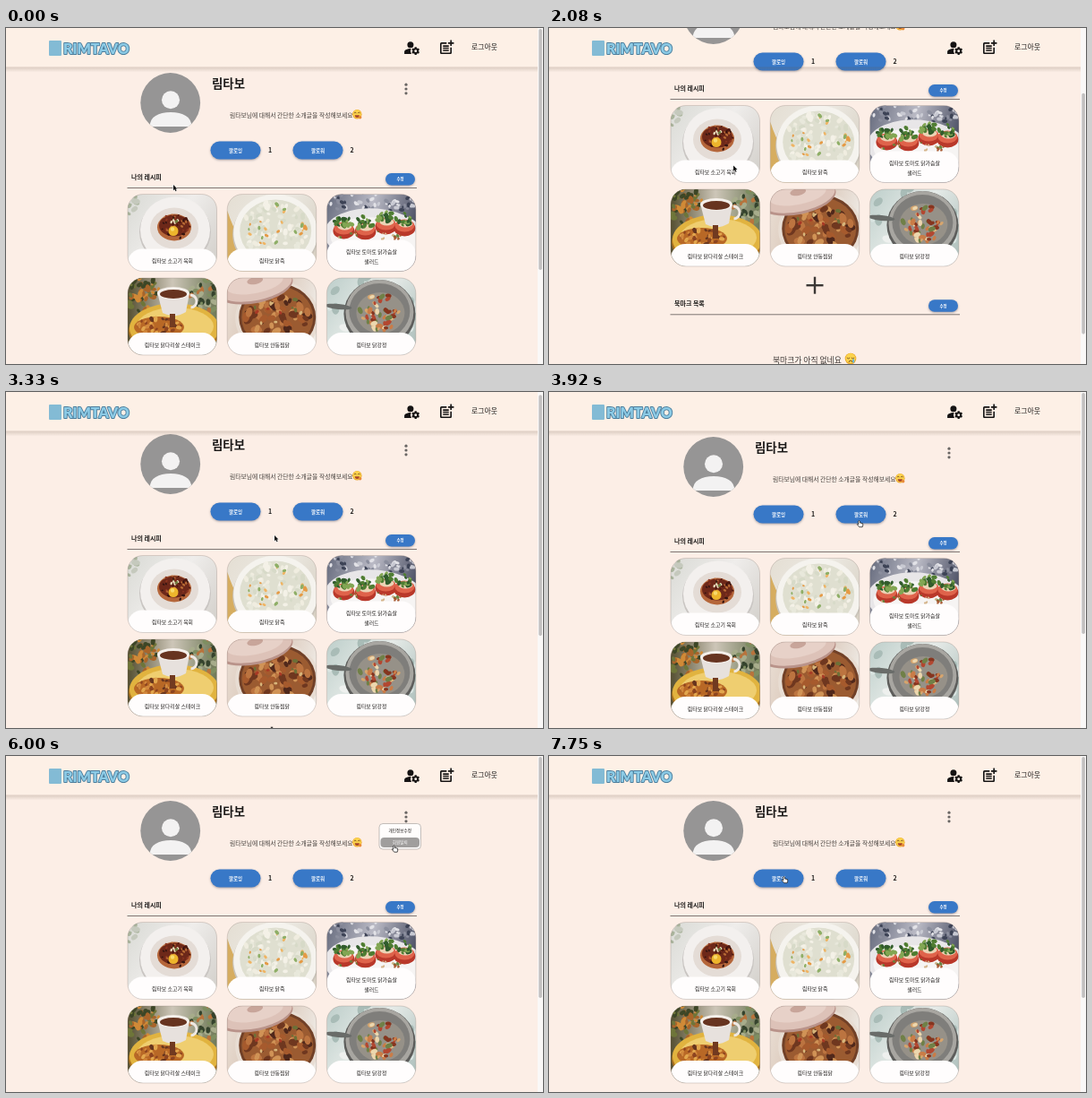
Recreate the animation shown at these times as an HTML page with a canvas. Size 600 by 375 pixels, loop 8000 ms.

```html
<!DOCTYPE html>
<html lang="ko">
<head>
<meta charset="utf-8">
<title>나의 레시피</title>
<style>
html, body { margin: 0; width: 100%; height: 100%; overflow: hidden; background: #fceee6; }
canvas { display: block; width: 600px; height: 375px; }
</style>
</head>
<body>
<canvas id="stage"></canvas>
<script>
const LOOP = 8000, STEP = 1000 / 12, LAST = 93;
const KO = '"Noto Sans CJK KR", "Noto Sans CJK", sans-serif';
const BLUE = '#3878c7', INK = '#1c1a19';
const canvas = document.getElementById('stage');
const ctx = canvas.getContext('2d');
const ratio = Math.max(1, window.devicePixelRatio || 1);
canvas.width = 600 * ratio;
canvas.height = 375 * ratio;

// Keys are [step, value, value, ...]
const SCROLL = [[19, 0], [20, 5], [22, 47], [25, 99], [28, 130], [31, 143], [35, 143], [36, 118], [38, 42], [39, 16], [40, 3], [41, 0]];
const POINTER = [[2, 187, 175], [9, 206, 153.5], [28, 206, 153.5], [35, 239.5, 165.5], [40, 300, 160], [46, 346.5, 143.5],
  [50, 346.5, 143.5], [56, 446, 67], [59, 446, 67], [65, 440, 82], [71, 433.5, 100], [75, 433.5, 100], [82, 300, 122], [88, 262.5, 134.5]];
const HOVER = [[29, 0], [32, 1], [35, 1], [38, 0]];
const MENU_OPEN = 58, MENU_SHUT = 77;

const linear = u => u;
const smooth = u => u * u * (3 - 2 * u);

function at(keys, n, ease) {
  const i = keys.findIndex(k => k[0] > n);
  if (i === 0) return keys[0].slice(1);
  if (i < 0) return keys[keys.length - 1].slice(1);
  const a = keys[i - 1], b = keys[i];
  const u = ease((n - a[0]) / (b[0] - a[0]));
  return a.slice(1).map((v, j) => v + (b[j + 1] - v) * u);
}

function seeded(seed) {
  return () => (seed = (seed * 16807) % 2147483647) / 2147483647;
}

function rect(x, y, w, h, color) {
  ctx.fillStyle = color;
  ctx.fillRect(x, y, w, h);
}

function round(x, y, w, h, r, color) {
  ctx.beginPath();
  ctx.roundRect(x, y, w, h, r);
  ctx.fillStyle = color;
  ctx.fill();
}

function oval(x, y, rx, ry, color, turn = 0) {
  ctx.beginPath();
  ctx.ellipse(x, y, rx, ry, turn, 0, Math.PI * 2);
  ctx.fillStyle = color;
  ctx.fill();
}

function dot(x, y, r, color) {
  oval(x, y, r, r, color);
}

function text(str, x, y, size, { color = INK, weight = 500, align = 'left', family = KO } = {}) {
  ctx.font = `${weight} ${size}px ${family}`;
  ctx.textAlign = align;
  ctx.fillStyle = color;
  ctx.fillText(str, x, y + size * 0.37);
}

function shadowed(color, blur, dy, draw) {
  ctx.save();
  ctx.shadowColor = color;
  ctx.shadowBlur = blur * ratio;
  ctx.shadowOffsetY = dy * ratio;
  draw();
  ctx.restore();
}

function fade(x0, y0, x1, y1, ...colors) {
  const g = ctx.createLinearGradient(x0, y0, x1, y1);
  colors.forEach((c, i) => g.addColorStop(i / (colors.length - 1), c));
  return g;
}

// Scatters small bits of food inside an ellipse.
function bits(seed, count, x, y, rx, ry, size, colors) {
  const rnd = seeded(seed);
  for (let i = 0; i < count; i++) {
    const a = rnd() * Math.PI * 2, d = Math.sqrt(rnd()), s = size * (0.6 + rnd() * 0.7);
    oval(x + Math.cos(a) * d * rx, y + Math.sin(a) * d * ry, s, s * 0.65, colors[i % colors.length], rnd() * 3);
  }
}

function beefBowl() {
  rect(0, 0, 100, 87, fade(0, 0, 100, 70, '#d9dad5', '#efedeb', '#d4d1cc'));
  bits(11, 10, 4, 10, 9, 14, 4, ['#a9b39b', '#c5c9bd']);
  oval(53, 42, 40, 38, '#c9c5c2');
  oval(53, 40, 39, 37, '#f3f0ee');
  oval(52, 38, 27, 23, '#e4dcd6');
  oval(52, 37, 19, 15, '#b5663a');
  oval(52, 35, 17, 12, '#6d2819');
  bits(7, 42, 52, 36, 18, 14, 1.7, ['#4d170f', '#8c3520', '#b96c35', '#351410']);
  dot(51, 41, 5.5, '#edb52c');
  dot(50, 39, 2.2, '#f8da6c');
  bits(5, 7, 52, 29, 5, 4, 1.5, ['#e8dcbc', '#718141']);
}

function porridge() {
  rect(0, 0, 100, 87, fade(0, 0, 100, 60, '#e4ded3', '#ece9e2', '#d8d1c4'));
  ctx.beginPath();
  ctx.moveTo(0, 18);
  ctx.quadraticCurveTo(10, 50, 38, 87);
  ctx.lineTo(0, 87);
  ctx.fillStyle = '#d6ad60';
  ctx.fill();
  oval(54, 45, 48, 44, '#c9c3b9');
  oval(54, 43, 47, 43, '#f5f3ee');
  oval(54, 41, 40, 35, '#dfdfd0');
  bits(23, 90, 54, 40, 37, 32, 3.2, ['#f4f1e7', '#e8e8db', '#d7dac8', '#f0ede0']);
  bits(38, 24, 54, 38, 34, 28, 2.3, ['#e59a45', '#8eae66', '#efb463']);
}

function salad() {
  rect(0, 0, 100, 87, fade(0, 0, 100, 30, '#666b7d', '#babac5', '#4d5165'));
  bits(17, 60, 50, 8, 52, 13, 2.5, ['#e2e2e7', '#3d4356', '#8b8e9d', '#c9cad3']);
  oval(54, 47, 57, 31, '#e8e6e8', 0.08);
  oval(54, 50, 50, 24, '#f6f4f3', 0.08);
  [[19, 37], [43, 38], [66, 32], [87, 34]].forEach(([x, y], i) => {
    oval(x, y + 4, 12, 9, '#b9382a');
    oval(x, y + 1, 11, 7, '#df634b');
    oval(x + 1, y - 1, 8, 4, '#ecd3b5');
    bits(31 + i, 14, x - 1, y - 6, 10, 7, 3, ['#4f7d32', '#315c2c', '#82a653']);
  });
  bits(71, 28, 51, 50, 43, 9, 1.7, ['#a85931', '#d5b58c', '#66813d']);
}

function steak() {
  rect(0, 0, 100, 87, fade(0, 0, 100, 0, '#554f31', '#cdc6b8', '#6e7856'));
  bits(43, 50, 15, 18, 20, 25, 3.6, ['#3d4626', '#a9652a', '#6e7539', '#d08a37']);
  bits(47, 45, 88, 18, 18, 20, 3.4, ['#35432d', '#7e8e61', '#b8733c', '#a7ac8b']);
  oval(52, 59, 51, 29, '#a9701d');
  oval(52, 56, 50, 28, '#e1b33f');
  oval(53, 54, 43, 21, '#efce70');
  oval(35, 55, 28, 12, '#b86826');
  bits(53, 45, 35, 53, 25, 10, 2.7, ['#8d4420', '#d2883d', '#67351e', '#e2a64d']);
  ctx.beginPath();
  ctx.moveTo(33, 16);
  ctx.lineTo(39, 39);
  ctx.quadraticCurveTo(52, 46, 65, 38);
  ctx.lineTo(69, 17);
  ctx.fillStyle = '#e7e1dd';
  ctx.fill();
  oval(51, 17, 18, 7, '#f4efea');
  oval(51, 18, 15, 5, '#673420');
  ctx.beginPath();
  ctx.arc(70, 26, 7, -1.6, 1.5);
  ctx.strokeStyle = '#eee8e2';
  ctx.lineWidth = 3;
  ctx.stroke();
  rect(47, 40, 6, 15, '#713a20');
}

function stew() {
  rect(0, 0, 100, 87, fade(0, 0, 100, 30, '#eadfd5', '#d8c4b5', '#eee9e3'));
  oval(56, 45, 47, 42, '#e8ddd3');
  oval(56, 44, 43, 38, '#714027');
  oval(56, 44, 40, 35, '#9b5b31');
  bits(61, 60, 56, 41, 35, 26, 5, ['#6f371f', '#bc7440', '#d09356', '#50281b', '#a65a2d']);
  bits(67, 14, 56, 39, 29, 21, 2.4, ['#d7b57a', '#6d7037', '#a83925']);
  oval(31, 10, 43, 18, '#b9938a', -0.2);
  oval(31, 8, 42, 17, '#ddc2b8', -0.2);
  oval(31, 6, 32, 11, '#e7d1c8', -0.2);
  oval(31, 3, 9, 4, '#c8a59a', -0.2);
}

function crispyChicken() {
  rect(0, 0, 100, 87, fade(0, 0, 100, 70, '#bdceca', '#e6ebe8', '#b0c1bd'));
  bits(83, 30, 50, 35, 54, 40, 5, ['#d9e4e1', '#a9bcb7', '#eef0ee']);
  oval(59, 40, 40, 38, '#5d5d5b');
  oval(59, 38, 38, 36, '#a8a6a1');
  oval(59, 37, 34, 31, '#7f7e7b');
  oval(60, 39, 27, 23, '#969188');
  bits(89, 55, 60, 38, 24, 20, 3.2, ['#d6a56d', '#b34730', '#ecd7ae', '#708047', '#86351f', '#ca7c47']);
  oval(13, 32, 15, 3, '#696c69', 0.1);
}

const CARDS = [
  [beefBowl, '림타보 소고기 육회'],
  [porridge, '림타보 닭죽'],
  [salad, '림타보 토마토 닭가슴살', '샐러드'],
  [steak, '림타보 닭다리살 스테이크'],
  [stew, '림타보 안동찜닭'],
  [crispyChicken, '림타보 닭강정']
];

function star(x, y, r, filled) {
  ctx.beginPath();
  for (let i = 0; i < 10; i++) {
    const a = -Math.PI / 2 + i * Math.PI / 5, d = i % 2 ? r * 0.45 : r;
    ctx.lineTo(x + Math.cos(a) * d, y + Math.sin(a) * d);
  }
  ctx.closePath();
  ctx.fillStyle = ctx.strokeStyle = '#e9b82f';
  ctx.lineWidth = 0.7;
  if (filled) ctx.fill();
  ctx.stroke();
}

function card([photo, ...lines], i, hover) {
  const top = (lines.length > 1 ? 51 : 61) - 22 * hover;
  ctx.save();
  ctx.translate(136 + (i % 3) * 111.2, 185.5 + Math.floor(i / 3) * 93.5);
  ctx.save();
  ctx.beginPath();
  ctx.roundRect(0, 0, 99.5, 86, 17);
  ctx.clip();
  photo();
  round(0, top, 99.5, 90 - top, [16, 16, 0, 0], '#fffdfd');
  ctx.restore();
  ctx.beginPath();
  ctx.roundRect(0, 0, 99.5, 86, 17);
  ctx.strokeStyle = 'rgba(135,120,115,.5)';
  ctx.lineWidth = 0.6;
  ctx.stroke();
  lines.forEach((line, j) => text(line, 50, top + 13.5 + j * 10.5, 5.9, { align: 'center' }));
  if (hover > 0) {
    ctx.globalAlpha = hover;
    text('난이도', 13.5, 73, 4.2, { color: '#aaa5a2', weight: 400 });
    for (let s = 0; s < 3; s++) star(31.5 + s * 8, 72.5, 4, s === 0);
    text('30분', 77.5, 71.5, 4, { color: '#aaa5a2', weight: 400 });
  }
  ctx.restore();
}

function button(x, y, w, h, label, size) {
  shadowed('rgba(40,40,60,.4)', 2.5, 1, () => round(x, y, w, h, h / 2, BLUE));
  text(label, x + w / 2, y + h / 2, size, { color: '#fff', weight: 700, align: 'center' });
}

function section(title, y, titleY) {
  text(title, 140, titleY, 7, { weight: 700 });
  button(424, y - 16, 33, 13.5, '수정', 4.4);
  rect(135.5, y, 323.5, 1, '#7d7673');
}

function face(x, y, r, sad) {
  dot(x, y, r, '#e9a329');
  dot(x, y - 0.4, r * 0.88, '#fbd34d');
  ctx.strokeStyle = '#69401d';
  ctx.lineWidth = 0.8;
  for (const s of [-1, 1]) {
    ctx.beginPath();
    ctx.arc(x + s * r * 0.4, y - r * 0.2, r * 0.2, sad ? 0 : Math.PI, sad ? Math.PI : 0);
    ctx.stroke();
  }
  if (sad) {
    ctx.beginPath();
    ctx.arc(x, y + r * 0.65, r * 0.3, Math.PI, 0);
    ctx.stroke();
    oval(x + r * 0.5, y + r * 0.4, r * 0.17, r * 0.38, '#64b5df');
  } else {
    ctx.beginPath();
    ctx.arc(x, y + r * 0.2, r * 0.5, 0, Math.PI);
    ctx.fillStyle = '#a94429';
    ctx.fill();
    dot(x + r * 0.65, y + r * 0.65, r * 0.33, '#e98b3c');
  }
}

function profile() {
  ctx.save();
  ctx.beginPath();
  ctx.arc(183.7, 83.5, 33.4, 0, Math.PI * 2);
  ctx.clip();
  rect(150, 50, 68, 68, '#969595');
  dot(184, 80.3, 10, '#f3f2f2');
  ctx.beginPath();
  ctx.moveTo(160.5, 110);
  ctx.bezierCurveTo(161, 99, 170, 94, 184, 94);
  ctx.bezierCurveTo(198, 94, 207, 99, 207.5, 110);
  ctx.fillStyle = '#f3f2f2';
  ctx.fill();
  ctx.restore();
  text('림타보', 230, 62, 13.4, { weight: 700 });
  text('림타보님에 대해서 간단한 소개글을 작성해보세요', 250, 97, 6.8, { color: '#45403d', weight: 400 });
  face(392.3, 96.3, 5.2, false);
  [63.2, 68, 72.8].forEach(y => dot(447, y, 1.6, '#6a6664'));
  button(228.5, 126.5, 56, 20, '팔로잉', 5.5);
  button(320.5, 126.5, 56, 20, '팔로워', 5.5);
  text('1', 293, 136, 7, { weight: 700 });
  text('2', 384.5, 136, 7, { weight: 700 });
}

function menu(py) {
  round(417, 75.5, 46.5, 28.5, 4, '#fffdfc');
  ctx.strokeStyle = '#aaa5a2';
  ctx.lineWidth = 0.7;
  ctx.stroke();
  ['개인정보수정', '회원탈퇴'].forEach((label, i) => {
    const y = 83.3 + i * 13.2, on = py > y - 6 && py < y + 6;
    if (on) round(418.5, y - 5.5, 43.5, 11, 4, '#a09e9d');
    text(label, 440.2, y, 4.6, { color: on ? '#fff' : INK, align: 'center' });
  });
}

function icon(x, y, scale, path) {
  ctx.save();
  ctx.translate(x, y);
  ctx.scale(scale, scale);
  ctx.fillStyle = '#151313';
  ctx.fill(new Path2D(path), 'evenodd');
  ctx.restore();
}

function gear(x, y) {
  ctx.save();
  ctx.translate(x, y);
  for (let i = 0; i < 6; i++) {
    ctx.rotate(Math.PI / 3);
    rect(-1.1, -4.4, 2.2, 2.6, '#151313');
  }
  ctx.beginPath();
  ctx.arc(0, 0, 2.4, 0, Math.PI * 2);
  ctx.strokeStyle = '#151313';
  ctx.lineWidth = 1.9;
  ctx.stroke();
  ctx.restore();
}

function header() {
  rect(0, 43.5, 594, 6, fade(0, 43.5, 0, 49.5, 'rgba(105,85,65,.22)', 'rgba(105,85,65,0)'));
  round(48, 14, 14, 17, 1, '#83bbd5');
  ctx.font = '900 16px Lato, sans-serif';
  ctx.textAlign = 'left';
  ctx.lineJoin = 'round';
  ctx.lineWidth = 1.8;
  ctx.strokeStyle = '#4b7d9c';
  ctx.strokeText('RIMTAVO', 64, 29.3);
  ctx.fillStyle = '#8ccbe6';
  ctx.fillText('RIMTAVO', 64, 29.3);
  dot(451.9, 18.8, 3.5, '#151313');
  icon(443.4, 12, 0.85, 'M10.7 13C7.8 12.9 5.4 13.6 3.4 14.8 2.5 15.3 2 16.3 2 17.3V20h9.3A7 7 0 0 1 10.7 13z');
  gear(457.7, 25.6);
  icon(482.6, 12, 0.81, 'M17 19H5V7h7V5H5C3.9 5 3 5.900 3 7v12c0 1.100.9 2 2 2h12c1.100 0 2-.9 2-2v-7h-2z' +
    'M19 2h-2v3h-3v2h3v3h2V7h3V5h-3zM7 9h8v2H7zM7 12h8v2H7zM7 15h8v2H7z');
  text('로그아웃', 520, 21.3, 7.9);
}

function arrow(x, y) {
  ctx.beginPath();
  [[0, 0], [0, 6.2], [1.4, 5], [2.5, 7.2], [3.6, 6.7], [2.6, 4.6], [4.5, 4.5]].forEach(([dx, dy]) => ctx.lineTo(x + dx, y + dy));
  ctx.closePath();
  ctx.strokeStyle = '#fff';
  ctx.lineWidth = 1;
  ctx.stroke();
  ctx.fillStyle = '#111';
  ctx.fill();
}

function hand(x, y) {
  ctx.save();
  ctx.translate(x, y);
  ctx.beginPath();
  ctx.moveTo(-0.8, 0.6);
  ctx.quadraticCurveTo(0, -0.5, 0.8, 0.6);
  ctx.lineTo(1, 2.5);
  ctx.lineTo(4, 3.2);
  ctx.quadraticCurveTo(4.700, 5, 3.7, 7.2);
  ctx.lineTo(0.2, 7.2);
  ctx.lineTo(-2.3, 4.2);
  ctx.quadraticCurveTo(-2, 3.2, -0.6, 4.2);
  ctx.closePath();
  ctx.fillStyle = '#fff';
  ctx.fill();
  ctx.strokeStyle = '#222';
  ctx.lineWidth = 0.8;
  ctx.stroke();
  ctx.restore();
}

function clickable(x, y, menuOn) {
  const inside = (l, t, r, b) => x > l && x < r && y > t && y < b;
  return inside(228, 126, 285, 147) || inside(320, 126, 377, 147) || inside(443, 60, 451, 76) ||
    (menuOn && inside(417, 75, 464, 104));
}

function draw(n) {
  const [scroll] = at(SCROLL, n, linear);
  const [px, py] = at(POINTER, n, smooth);
  const [hover] = at(HOVER, n, smooth);
  const menuOn = n >= MENU_OPEN && n < MENU_SHUT;

  ctx.setTransform(ratio, 0, 0, ratio, 0, 0);
  rect(0, 0, 600, 375, '#fceee6');
  rect(0, 0, 594, 43.5, '#fdf0e6');

  ctx.save();
  ctx.translate(0, -scroll);
  profile();
  section('나의 레시피', 178, 166.5);
  CARDS.forEach((c, i) => card(c, i, i === 3 ? hover : 0));
  rect(287.5, 385, 19, 2.4, '#3b3735');
  rect(295.8, 376.7, 2.4, 19, '#3b3735');
  section('북마크 목록', 418.3, 406.5);
  text('북마크가 아직 없네요', 250, 469.5, 8.8, { color: '#3b3735', weight: 400 });
  face(337, 468, 6.3, true);
  if (menuOn) menu(py);
  ctx.restore();

  header();
  rect(594, 0, 6, 375, '#faf8f7');
  round(595.3, scroll * 375 / 518 + 1, 3.6, 269, 1.8, '#c2c0c0');
  (clickable(px, py + scroll, menuOn) ? hand : arrow)(px, py);
}

let shown = -1;
function tick(now) {
  const n = Math.min(LAST, Math.floor((now % LOOP + 4) / STEP));
  if (n !== shown) draw(shown = n);
  requestAnimationFrame(tick);
}
draw(0);
requestAnimationFrame(tick);
</script>
</body>
</html>
```
